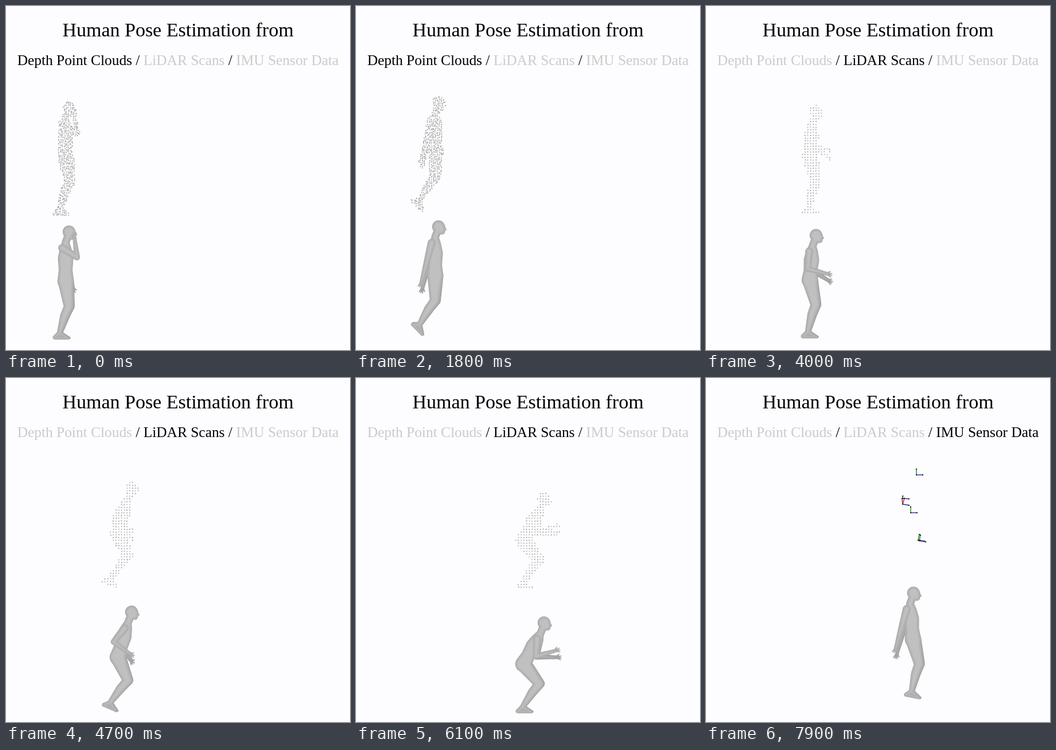
Write an HTML page with a canvas that moves like this. It is 600 by 600 pixels and loops after 8000 ms.

```html
<!DOCTYPE html>
<html lang="en">
<head>
<meta charset="utf-8">
<title>Human Pose Estimation</title>
<style>
html, body { margin: 0; width: 100%; height: 100%; overflow: hidden; background: #fdfcfe; }
canvas, svg { position: absolute; left: 0; top: 0; width: 600px; height: 600px; }
text { font-family: "Liberation Serif", "Times New Roman", serif; text-anchor: middle; }
</style>
</head>
<body>
<canvas id="stage" width="600" height="600"></canvas>
<svg viewBox="0 0 600 600">
  <text x="300" y="53" font-size="34">Human Pose Estimation from</text>
  <text x="300" y="103" font-size="25.4"><tspan class="mode">Depth Point Clouds</tspan> / <tspan class="mode">LiDAR Scans</tspan> / <tspan class="mode">IMU Sensor Data</tspan></text>
</svg>
<script>
const ctx = document.getElementById('stage').getContext('2d');
const modes = document.querySelectorAll('.mode');
const LIFT = 216; // height of the sensor view above the mesh

// Offsets from the ankle: hip x y, neck x y, foot angle, wrist x y
const shapes = {
  think:  [11, -91, 11, -159, 0, 27, -163],
  ready:  [3, -90, 20, -151, 0, 45, -121],
  stand:  [4, -91, 9, -151, 0, 30, -103],
  crouch: [2, -75, 32, -129, 0, 53, -97],
  absorb: [-3, -74, 19, -132, 0, 42, -104],
  push:   [28, -86, 28, -153, 45, 5, -78],
  float:  [3, -91, -2, -154, 11, -26, -80],
  land:   [-18, -90, -15, -151, 3, -46, -88]
};
// Step, shape, ankle x y
const keys = [
  [0, 'think', 93, 571], [10, 'ready', 93, 570], [13, 'absorb', 93, 573],
  [16, 'crouch', 93, 574], [18, 'push', 110, 556], [20, 'float', 153, 550],
  [22, 'land', 176, 567], [23.5, 'absorb', 177, 571], [26, 'stand', 177, 569],
  [29, 'absorb', 177, 573], [32, 'crouch', 177, 574], [34, 'push', 190, 557],
  [36, 'float', 246, 550], [38, 'land', 286, 567], [41, 'absorb', 288, 571],
  [44, 'stand', 288, 570], [47, 'crouch', 290, 574], [49, 'push', 306, 556],
  [51, 'float', 358, 547]
];
const tracks = keys.map(([step, name, x, y]) => {
  const [hx, hy, nx, ny, foot, wx, wy] = shapes[name];
  return { step, v: [x, y, x + hx, y + hy, x + nx, y + ny, foot, x + wx, y + wy] };
});

// Monotone cubic between keys, so planted feet stay planted
function slope(i, c) {
  const a = tracks[i - 1], b = tracks[i], d = tracks[i + 1];
  if (!a || !d) return 0;
  const m = (b.v[c] - a.v[c]) / (b.step - a.step), n = (d.v[c] - b.v[c]) / (d.step - b.step);
  return m * n > 0 ? 2 * m * n / (m + n) : 0;
}
function poseAt(step) {
  let i = 0;
  while (i < tracks.length - 2 && step >= tracks[i + 1].step) i++;
  const a = tracks[i], b = tracks[i + 1], h = b.step - a.step, u = (step - a.step) / h;
  const e = u * u * (3 - 2 * u);
  return a.v.map((p, c) => p + (b.v[c] - p) * e +
    h * u * (1 - u) * ((1 - u) * slope(i, c) - u * slope(i + 1, c)));
}

const add = (p, x, y) => [p[0] + x, p[1] + y];
const mix = (p, q, k) => [p[0] + (q[0] - p[0]) * k, p[1] + (q[1] - p[1]) * k];
function turn(p, x, y, deg) {
  const r = deg * Math.PI / 180, c = Math.cos(r), s = Math.sin(r);
  return add(p, x * c - y * s, x * s + y * c);
}
// Middle joint of a two-bone limb
function bend(a, b, la, lb, side) {
  const dx = b[0] - a[0], dy = b[1] - a[1], d = Math.hypot(dx, dy);
  const along = (la * la - lb * lb + d * d) / (2 * d);
  const out = side * Math.sqrt(Math.max(0, la * la - along * along));
  return add(a, (dx * along - dy * out) / d, (dy * along + dx * out) / d);
}

function leg(hip, ankle, foot) {
  const knee = bend(hip, ankle, 44, 50, -1);
  const calf = add(mix(knee, ankle, .35), -1.5, 0);
  const heel = turn(ankle, -8, 7, foot), toe = turn(ankle, 16, 8.5, foot);
  return { knee, parts: [
    [hip, 13.5, knee, 8.4], [knee, 8.2, calf, 7.6], [calf, 7.6, ankle, 4.4],
    [ankle, 4.4, heel, 3.5], [ankle, 4, toe, 2.2], [heel, 3.5, toe, 2.2]
  ] };
}
function arm(shoulder, wrist) {
  const elbow = bend(shoulder, wrist, 30.5, 30.5, 1);
  const deg = Math.atan2(wrist[1] - elbow[1], wrist[0] - elbow[0]) * 180 / Math.PI;
  const palm = turn(wrist, 3, 0, deg);
  const fingers = [-42, -14, 5, 24].map((a, i) =>
    [palm, 2, turn(palm, i ? 10 : 8, 0, deg + a), .8]);
  return { elbow, parts: [
    [shoulder, 7, elbow, 5.3], [elbow, 5.3, wrist, 3.3], [wrist, 3.3, palm, 3.4], ...fingers
  ] };
}

function figure(step) {
  const [ax, ay, hx, hy, nx, ny, foot, wx, wy] = poseAt(step);
  const ankle = [ax, ay], hip = [hx, hy], neck = [nx, ny], wrist = [wx, wy];
  const head = add(neck, 7, -17), shoulder = add(neck, -6, 10);
  const spine = k => mix(neck, hip, k);
  const rest = Math.max(0, 1 - step / 6);
  const farWrist = mix(add(wrist, 2, 10), [116, 488], rest);
  const near = leg(hip, ankle, foot), far = leg(add(hip, 1, 0), add(ankle, 1.5, -.5), foot);
  const nearArm = arm(shoulder, wrist), farArm = arm(add(shoulder, 4, 1), farWrist);
  const trunk = [
    [add(head, -1, -1), 11.3, add(head, 2, 3), 9.5],
    [add(head, 2, 2), 9, add(head, 5, 7), 5.5],
    [add(head, 8, 2), 3, add(head, 12, 4), 1.2],
    [add(head, -2, 5), 7, neck, 6.8],
    [neck, 6.3, spine(.2), 10.5], [spine(.2), 10.5, spine(.42), 13.5],
    [spine(.42), 13.5, spine(.72), 12], [spine(.72), 12, hip, 14.3]
  ];
  return {
    layers: [farArm.parts, far.parts, [...trunk, ...near.parts], nearArm.parts],
    head, hip, knee: near.knee, elbow: nearArm.elbow
  };
}

// Outline around two circles
function taper(path, [a, ra, b, rb], inset) {
  const p = Math.max(.2, ra - inset), q = Math.max(.2, rb - inset);
  const dx = b[0] - a[0], dy = b[1] - a[1], d = Math.hypot(dx, dy) || 1;
  const dir = Math.atan2(dy, dx), off = Math.acos(Math.max(-1, Math.min(1, (p - q) / d)));
  path.moveTo(a[0] + p * Math.cos(dir + off), a[1] + p * Math.sin(dir + off));
  path.arc(a[0], a[1], p, dir + off, dir + 2 * Math.PI - off);
  path.arc(b[0], b[1], q, dir - off, dir + off);
  path.closePath();
}
function outline(parts, inset = 0) {
  const path = new Path2D();
  parts.forEach(part => taper(path, part, inset));
  return path;
}
function drawMesh(layers) {
  layers.forEach((parts, i) => {
    for (let k = 0; k < 6; k++) {
      const g = (i < 2 ? 160 : 172) + k * 4;
      ctx.fillStyle = `rgb(${g},${g},${g})`;
      ctx.fill(outline(parts.filter(p => !k || Math.max(p[1], p[3]) > k), k));
    }
  });
}

function random(seed) {
  return () => {
    seed = (seed * 1664525 + 1013904223) >>> 0;
    return seed / 4294967296;
  };
}
// Points on a grid, kept where they fall on the body
function drawCloud(fig, step, gap, jitter, dark) {
  const body = outline(fig.layers.flat()), rnd = random(step * 977 + 5);
  const left = Math.floor((fig.hip[0] - 85) / gap) * gap;
  for (let y = 360; y < 592; y += gap) {
    for (let x = left; x < left + 175; x += gap) {
      const px = x + (rnd() - .5) * jitter, py = y + (rnd() - .5) * jitter;
      const g = dark + Math.floor(rnd() * 36);
      if (!ctx.isPointInPath(body, px, py)) continue;
      ctx.fillStyle = `rgb(${g},${g},${g})`;
      ctx.beginPath();
      ctx.arc(px, py - LIFT, 1.15, 0, 7);
      ctx.fill();
    }
  }
}

function stick(a, b, color) {
  ctx.strokeStyle = color;
  ctx.lineWidth = 1.4;
  ctx.beginPath();
  ctx.moveTo(...a);
  ctx.lineTo(...b);
  ctx.stroke();
  ctx.fillStyle = '#222';
  for (const p of [a, b]) ctx.fillRect(p[0] - 1, p[1] - 1, 2, 2);
}
function drawAxes(p, deg, up = 10) {
  stick(p, turn(p, 0, -up, deg), '#178a17');
  stick(p, turn(p, 11, 0, deg), '#2626b8');
}
function drawSensors({ head, hip, knee, elbow }) {
  const lift = (p, x, y) => add(p, x, y - LIFT);
  const arm = lift(elbow, 2, -3), leg = lift(knee, -1, 0);
  drawAxes(lift(head, 4, 9), 0);
  drawAxes(lift(hip, -4, -5), 0);
  drawAxes(add(arm, 0, -6), 4, 4);
  stick(add(arm, 0, 4), add(arm, -1, -6), '#a02020');
  stick(add(arm, 0, 4), add(arm, 3, -6), '#c02020');
  stick(add(arm, 0, 4), add(arm, 11, 6), '#2626b8');
  drawAxes(leg, 10);
  drawAxes(add(leg, 2, 1), 10);
  stick(leg, add(leg, 3, 1), '#a02020');
}

// Each mode opens with its first pose held for 1.5 s
function stepAt(n) {
  if (n < 25) return n;
  if (n < 40) return 25;
  if (n < 64) return n - 14;
  return n < 79 ? 50 : 51;
}
let shown = -1;
function render(time) {
  const n = Math.floor((time % 8000) / 100);
  if (n !== shown) {
    shown = n;
    const mode = n < 25 ? 0 : n < 64 ? 1 : 2, step = stepAt(n), fig = figure(step);
    modes.forEach((el, i) => el.setAttribute('fill', i === mode ? '#000' : '#cbcbcb'));
    ctx.clearRect(0, 0, 600, 600);
    if (mode === 0) drawCloud(fig, step, 3.3, 2.3, 156);
    if (mode === 1) drawCloud(fig, step, 4.8, .9, 164);
    if (mode === 2) drawSensors(fig);
    drawMesh(fig.layers);
  }
  requestAnimationFrame(render);
}
render(0);
</script>
</body>
</html>
```
